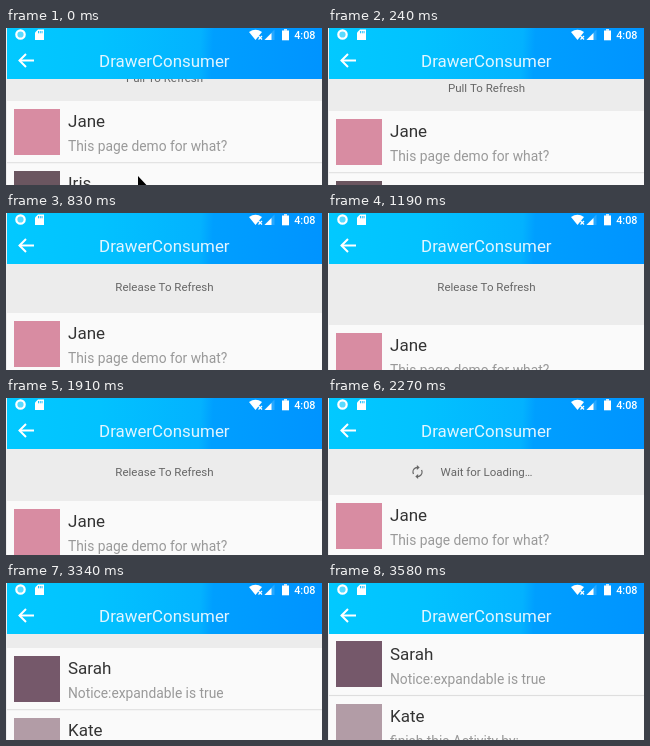
An HTML page with a canvas for the animation above (3760 ms loop, 316 by 157 pixels).

```html
<!DOCTYPE html>
<html lang="en">
<head>
<meta charset="utf-8">
<title>Pull to refresh</title>
<style>
  html, body { margin: 0; width: 100%; height: 100%; overflow: hidden; background: #ececec; }
  canvas { display: block; width: 316px; height: 157px; }
</style>
</head>
<body>
<canvas id="stage"></canvas>
<script>
const W = 316, H = 157, LOOP = 3760;
const BAR = 51, HEADER = 46, ROW = 62.4;
const canvas = document.getElementById('stage');
const ctx = canvas.getContext('2d');
const dpr = window.devicePixelRatio || 1;
canvas.width = W * dpr;
canvas.height = H * dpr;

// [time, top of the list]; each value holds until the next
const LIST_TOP = [
  [0, 73], [120, 78], [240, 83], [360, 86.5], [480, 89.2], [600, 95], [710, 98], [830, 100],
  [1070, 107], [1190, 112], [1310, 115], [1430, 116],
  [1910, 103], [2030, 98], [2150, 97],
  [3220, 82], [3340, 65], [3460, 55], [3580, 50.7]
];
const LABELS = [
  [0, 'Pull To Refresh'], [710, 'Release To Refresh'],
  [2030, 'Wait for Loading…'], [3100, 'Refresh Success']
];
const BEFORE = [
  { name: 'Jane', note: 'This page demo for what?', color: '#d88ca2' },
  { name: 'Iris', note: '', color: '#6b5660' }
];
const AFTER = [
  { name: 'Sarah', note: 'Notice:expandable is true', color: '#75586a' },
  { name: 'Kate', note: 'finish this Activity by:', color: '#b29ca6' }
];

function held(keys, t) {
  let value = keys[0][1];
  for (const [at, v] of keys) if (t >= at) value = v;
  return value;
}

function text(str, x, y, size, color, align = 'left', weight = 400) {
  ctx.font = `${weight} ${size}px Roboto, sans-serif`;
  ctx.textAlign = align;
  ctx.fillStyle = color;
  ctx.fillText(str, x, y);
}

function rect(x, y, w, h, color) {
  ctx.fillStyle = color;
  ctx.fillRect(x, y, w, h);
}

function path(points, close) {
  ctx.beginPath();
  points.forEach(([x, y]) => ctx.lineTo(x, y));
  if (close) ctx.closePath();
}

function fillPath(points, color) {
  path(points, true);
  ctx.fillStyle = color;
  ctx.fill();
}

function strokePath(points, color, width) {
  path(points);
  ctx.strokeStyle = color;
  ctx.lineWidth = width;
  ctx.stroke();
}

function drawSpinner(x, y, angle) {
  ctx.save();
  ctx.translate(x, y);
  ctx.rotate(angle);
  ctx.strokeStyle = '#666';
  ctx.lineWidth = 1.3;
  for (let i = 0; i < 2; i++) {
    ctx.beginPath();
    ctx.arc(0, 0, 4.5, -0.45, 1.5);
    ctx.stroke();
    fillPath([[0.6, 2], [0.6, 7], [-2.2, 4.5]], '#666');
    ctx.rotate(Math.PI);
  }
  ctx.restore();
}

function drawHeader(t, top) {
  const y = Math.min(top - HEADER / 2, BAR + HEADER / 2) + 4;
  const loading = t >= 2030 && t < 3100;
  text(held(LABELS, t), 158.5, y, 11.5, '#666', 'center');
  if (loading) {
    const step = Math.floor((Math.min(t, 2750) - 2030) / 120);
    drawSpinner(89.5, 74, (step - 2) * Math.PI / 4);
  }
}

function drawRow(item, y) {
  rect(0, y, W, ROW, '#fafafa');
  rect(0, y + ROW - 1.2, W, 1.2, '#dedede');
  rect(8, Math.round(y + 7.6), 46, 46, item.color);
  text(item.name, 62, y + 26, 17, '#333');
  text(item.note, 62, y + 49.8, 13.8, '#999');
}

function drawStatus() {
  const white = '#fff';
  ctx.beginPath();
  ctx.arc(14.5, 6.5, 4.2, 0, 7);
  ctx.strokeStyle = white;
  ctx.lineWidth = 2.2;
  ctx.stroke();
  ctx.fillStyle = 'rgba(255,255,255,.35)';
  ctx.fill();

  fillPath([[32, 1.5], [38, 1.5], [38, 12], [29, 12], [29, 4.5]], white);
  for (let i = 0; i < 3; i++) rect(32 + i * 1.8, 3, 0.9, 2.3, '#0cbdff');

  ctx.beginPath();
  ctx.moveTo(249.5, 12);
  ctx.lineTo(243, 4);
  ctx.quadraticCurveTo(249.5, -0.5, 256, 4);
  ctx.closePath();
  ctx.fillStyle = white;
  ctx.fill();
  strokePath([[252.5, 8], [256, 11.5]], white, 1.2);
  strokePath([[256, 8], [252.5, 11.5]], white, 1.2);

  fillPath([[268.5, 1.5], [268.5, 12], [258, 12]], 'rgba(255,255,255,.15)');
  fillPath([[265.5, 5], [265.5, 12], [258.5, 12]], white);

  rect(276, 2.5, 7, 9.8, white);
  rect(278, 1.2, 3, 1.5, white);
  text('4:08', 309.5, 11, 10.8, white, 'right', 500);
}

function drawBar() {
  const sky = ctx.createLinearGradient(0, 0, 314, 16);
  sky.addColorStop(0, '#02c9ff');
  sky.addColorStop(0.3, '#02c2ff');
  sky.addColorStop(0.62, '#03b2ff');
  sky.addColorStop(0.66, '#009fff');
  sky.addColorStop(1, '#0094ff');
  rect(0, 0, W, BAR, sky);
  drawStatus();
  strokePath([[28, 32.5], [13.5, 32.5]], '#fff', 2);
  strokePath([[20, 26], [13.5, 32.5], [20, 39]], '#fff', 2);
  text('DrawerConsumer', 158.3, 39, 16.9, '#e2f5ff', 'center');
}

function drawCursor(x, y) {
  const arrow = [[0, 0], [0, 13], [3, 10.3], [5, 15], [7, 14], [5, 9.6], [9, 9.6]];
  fillPath(arrow.map(([dx, dy]) => [x + dx, y + dy]), '#000');
}

function draw(t) {
  const top = held(LIST_TOP, t);
  ctx.setTransform(dpr, 0, 0, dpr, 0, 0);
  rect(0, 0, W, H, '#ececec');
  drawHeader(t, top);
  const items = t < 3100 ? BEFORE : AFTER;
  items.forEach((item, i) => drawRow(item, top + i * ROW));
  drawBar();
  rect(0, 0, 1, H, '#eee');
  if (t < 480) drawCursor(132, 148 + (top - 73) * 1.5);
}

const start = performance.now();
function frame() {
  draw((performance.now() - start) % LOOP);
  requestAnimationFrame(frame);
}
frame();
</script>
</body>
</html>
```
